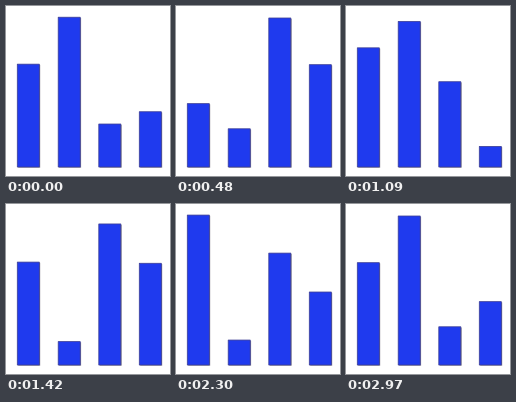
Animation of 164 by 170 pixels, one loop 3 s. Source, as a matplotlib script:

```python
import matplotlib.pyplot as plt
from matplotlib.animation import FuncAnimation
from matplotlib.patches import Rectangle

W, H, DPI = 164, 170, 100
FRAMES, INTERVAL = 300, 10
STEPS = 99            # distinct poses per loop
PERIOD = 32.8         # steps per bar cycle
LEAD = 1.4            # steps already run at the start
LEVELS = (102, 150.5, 20)
BASE, BAR_W = 161, 22
BLUE, EDGE, SHADE = "#1f3aee", "#3d3f96", "#8d8a92"
PX = 72 / DPI
BARS = ((11.3, 0), (52.2, 0.25), (92.8, 0.75), (133.3, 0.5))  # left, phase


def ease(u):
    return u * u * u * (u * (6 * u - 15) + 10)


def height(phase):
    i, u = divmod(phase % 1 * 3, 1)
    start, end = LEVELS[int(i)], LEVELS[(int(i) + 1) % 3]
    return start + (end - start) * ease(u)


fig = plt.figure(figsize=(W / DPI, H / DPI), dpi=DPI, facecolor="white")
ax = fig.add_axes([0, 0, 1, 1])
ax.set(xlim=(0, W), ylim=(H, 0))
ax.axis("off")


def add_bar(x, y, **style):
    return ax.add_patch(Rectangle((x, y), BAR_W, 0, snap=False, **style))


shadows = [add_bar(x + 0.9, BASE + 0.7, fc=SHADE, lw=0) for x, _ in BARS]
bars = [add_bar(x, BASE, fc=BLUE, ec=EDGE, lw=0.8 * PX) for x, _ in BARS]


def update(k):
    step = int((k + 0.5) * STEPS / FRAMES)
    for (_, offset), bar, shadow in zip(BARS, bars, shadows):
        h = height((step + LEAD) / PERIOD + offset)
        bar.set_height(-h)
        shadow.set_height(-h)
    return shadows + bars


anim = FuncAnimation(fig, update, frames=FRAMES, interval=INTERVAL,
                     repeat=True, repeat_delay=0, blit=False)
plt.show()
```
